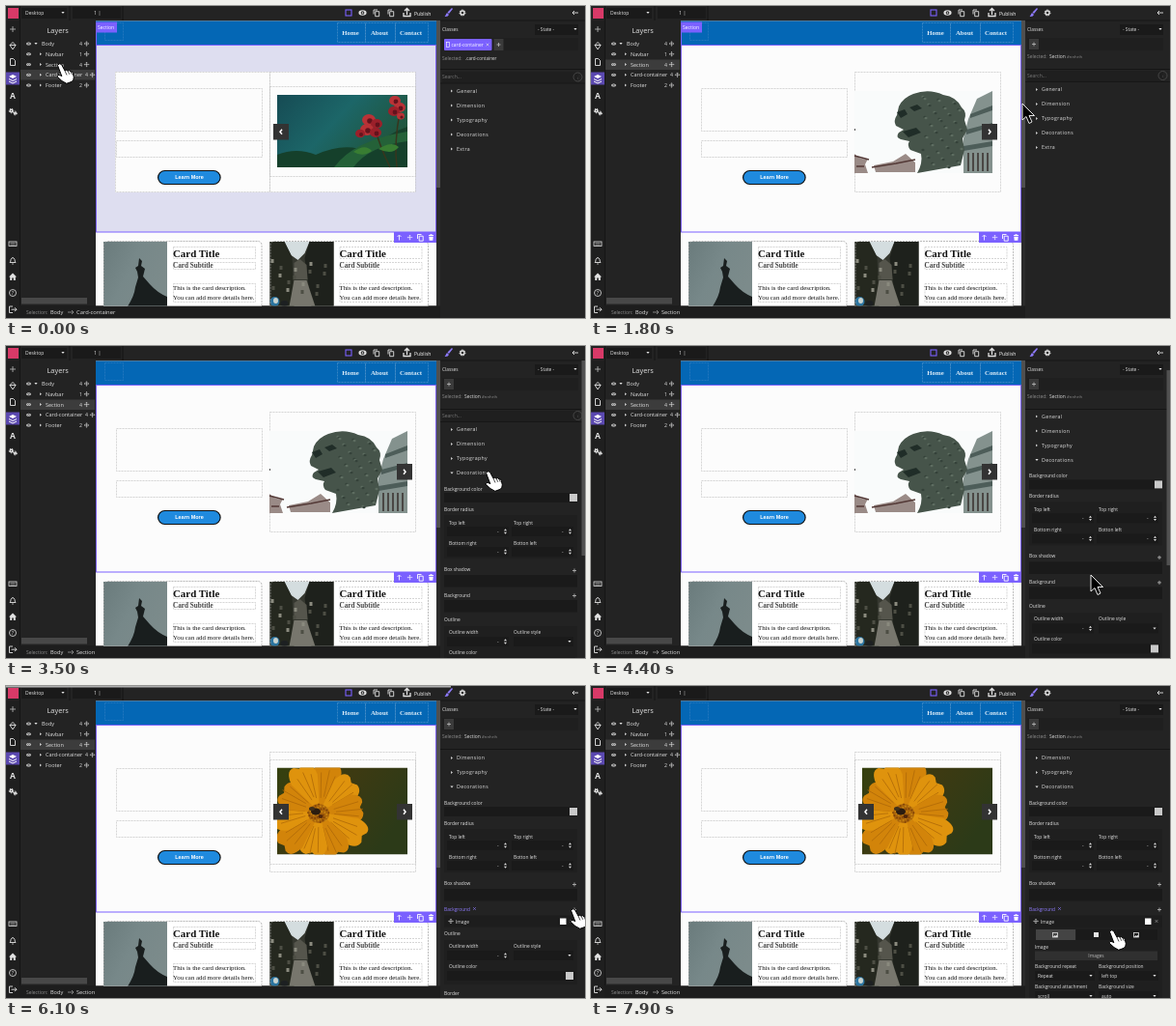
Recreate the animation shown at these times as an HTML page. Size 600 by 323 pixels, loop 8000 ms.

```html
<!DOCTYPE html>
<html lang="en">
<head>
<meta charset="utf-8">
<title>Page builder</title>
<style>
html, body { margin: 0; width: 100%; height: 100%; overflow: hidden; background: #232323; }
svg { display: block; width: 100vw; height: 100vh; }
text { font-family: "Open Sans", "Noto Sans", sans-serif; font-weight: 500; }
.serif { font-family: "Liberation Serif", serif; }
.arial { font-family: "Liberation Sans", sans-serif; }
.b { font-weight: bold; }
.wide { letter-spacing: .35px; }
.mid { text-anchor: middle; }
</style>
</head>
<body>
<svg id="stage" viewBox="0 0 600 323"></svg>
<script>
const INK = '#e2e2e2', DIM = '#8d8d8d', VIOLET = '#7b61ff', FIELD = '#1a1a1a', PANEL = '#232323';

// Drawing helpers; every one returns SVG markup.
const R = (x, y, w, h, fill, more = '') => `<rect x="${x}" y="${y}" width="${w}" height="${h}" fill="${fill}" ${more}/>`;
const T = (x, y, s, size = 4.9, fill = INK, cls = '') => `<text x="${x}" y="${y}" font-size="${size}" fill="${fill}" class="${cls}">${s}</text>`;
const F = (d, fill) => `<path d="${d}" fill="${fill}"/>`;
const L = (d, color = INK, w = .9) => `<path d="${d}" fill="none" stroke="${color}" stroke-width="${w}"/>`;
const E = (x, y, rx, ry, fill, more = '') => `<ellipse cx="${x}" cy="${y}" rx="${rx}" ry="${ry}" fill="${fill}" ${more}/>`;
const G = (id, s) => `<g id="${id}">${s}</g>`;
const at = (x, y, s) => `<g transform="translate(${x} ${y})">${s}</g>`;
const dash = (x, y, w, h, color = '#c4c4c4', r = 0) => R(x + .5, y + .5, w, h, 'none', `rx="${r}" stroke="${color}" stroke-width=".7" stroke-dasharray="2 1"`);
const eye = (x, y, k = 1) => E(x, y, 2.4 * k, 1.6 * k, INK) + E(x, y, 1.1 * k, 1.1 * k, PANEL) + E(x, y, .5 * k, .5 * k, INK);
const right = (x, y) => F(`M${x - .9} ${y - 1.4}l1.8 1.4l-1.8 1.4z`, INK);
const down = (x, y) => F(`M${x - 1.6} ${y - .9}h3.2l-1.6 1.9z`, INK);
const plus = (x, y, r = 2) => L(`M${x - r} ${y}h${2 * r}M${x} ${y - r}v${2 * r}`, '#bbb', .8);
const cross = (x, y, c = '#aaa') => L(`M${x - 1.4} ${y - 1.4}l2.8 2.8m0 -2.8l-2.8 2.8`, c, .6);
const move = (x, y, c = INK) => L(`M${x - 2.2} ${y}h4.4M${x} ${y - 2.2}v4.4M${x - .8} ${y - 1.5}l.8 -.8l.8 .8M${x - .8} ${y + 1.5}l.8 .8l.8 -.8M${x - 1.5} ${y - .8}l-.8 .8l.8 .8M${x + 1.5} ${y - .8}l.8 .8l-.8 .8`, c, .55);
const copy = (x, y, c = INK) => L(`M${x - 3} ${y + 1.5}v-4.5h4M${x - 1.3} ${y - 1.3}h4v5h-4z`, c);
const gear = (x, y, r) => `<circle cx="${x}" cy="${y}" r="${r}" fill="none" stroke="${INK}" stroke-width="1.4"/>` +
  `<circle cx="${x}" cy="${y}" r="${r + 1}" fill="none" stroke="${INK}" stroke-width="1" stroke-dasharray="1.3 1.3"/>`;
const arrow = (x, y, dir, c = INK) => L(`M${x - 3} ${y}h6M${x + dir} ${y - 2}l${2 * dir} 2l${-2 * dir} 2`, c, .9);

function toolbars() {
  let s = R(0, 0, 600, 323, PANEL) + R(0, 15, 14, 308, '#1f1f1f') + R(14, 310, 436, 13, '#1d1d1d');
  s += R(2, 2, 11, 11, '#d83a68');
  s += R(16, 2, 47, 11, FIELD) + T(20, 9.2, 'Desktop', 5) + down(59, 7);
  s += R(69, 1, 50, 12, FIELD) + T(91, 9.4, '1 |', 5.4);
  s += L('M14.5 0V310M66 0V15M121 0V15', '#151515', 1);
  s += R(352, 4, 6, 6, 'none', `stroke="${VIOLET}" stroke-width="1.1"`) + eye(369.5, 7, 1.7) + copy(384, 7) + copy(399, 7);
  s += L('M412 7v3.500h7v-3.500M415.500 9v-6M413 5l2.500 -2.500l2.500 2.500', INK, 1.3) + T(423, 9.6, 'Publish', 5.1, '#fff');
  s += R(0, 68.5, 14, 13, '#5b49b0');
  s += plus(7, 24, 3) + L('M7 37.500l3 3l-3 4.500l-3 -4.500zM4 40.500h6') + L('M4.500 54.500h3l2 2v5h-5z');
  s += F('M7 71l4 2l-4 2l-4 -2z', '#fff') + L('M3 75.500l4 2l4 -2M3 78l4 2l4 -2', '#fff', 1);
  s += T(4, 96, 'A', 8.5, INK, 'b') + gear(5.5, 108.5, 1.3) + gear(9.5, 111, .9);
  s += R(3, 244, 8, 4.5, 'none', `stroke="${INK}" stroke-width=".8"`) + L('M4.500 245.700h5M4.500 247.200h5', INK, .5);
  s += L('M4 265.500q1 -1 1 -3q2 -4 4 0q0 2 1 3zM6.300 267h1.400') + F('M3 280.500l4 -4l4 4h-1.200v3.500h-2v-2.500h-1.600v2.500h-2v-3.500z', INK);
  s += `<circle cx="7" cy="297" r="3.500" fill="none" stroke="${INK}" stroke-width=".8"/>` + T(5.7, 299, '?', 5.2);
  s += L('M7 311h-3.500v6.500h3.500M5.500 314.200h5.500M9 312.200l2 2l-2 2');
  return s;
}

function layers() {
  let s = G('rowCard', R(15, 66, 77, 10.500, '#3c3c3c')) + G('rowSection', R(15, 55.500, 77, 10.500, '#3c3c3c'));
  s += T(42.500, 28.200, 'Layers', 7.4);
  [['Body', 4], ['Navbar', 1], ['Section', 4], ['Card-container', 4], ['Footer', 2]].forEach(([name, n], i) => {
    const y = 39 + i * 10.75, wide = i == 3 ? 6 : 0;
    s += eye(23.500, y) + (i ? right(36, y) : down(31, y)) + T(i ? 41 : 37, y + 2, name, 5.5);
    s += T(76 + wide, y + 2, n, 5.2) + move(83.500 + wide, y);
  });
  s += R(16, 302, 68, 6.500, '#484848');
  s += T(21, 318.700, 'Selection:', 5, DIM) + T(46, 318.700, 'Body', 5.6) + arrow(67, 317, 1, DIM);
  return s + G('pathCard', T(73, 318.700, 'Card-container', 5.8)) + G('pathSection', T(73, 318.700, 'Section', 5.6));
}

const sideButton = (x, dir) => R(x, 122, 16, 16.500, '#333') + L(`M${x + 8 - dir} 127.700l${2 * dir} 2.500l${-2 * dir} 2.500`, '#fff', 1.5);

function redFlowers() {
  let s = R(281, 92, 135, 75, 'url(#teal)');
  s += F('M281 167v-13q20 -8 40 0q30 -14 55 -3q20 -20 40 -26v42z', '#15402b') + F('M340 167q20 -28 76 -37v10q-40 5 -56 27z', '#246138');
  s += L('M398 167Q387 145 381 122M405 167Q402 142 408 110', '#37351d', 1.5);
  s += F('M386 148q14 -9 21 -2q-7 9 -21 2M360 151q12 -9 19 -1q-9 7 -19 1', '#387d32');
  [[376, 118, 7], [384, 122, 6], [374, 128, 7], [383, 131, 6], [403, 98, 6], [367, 132, 5], [408, 105, 6], [402, 109, 6], [409, 114, 4]]
    .forEach(([x, y, r], i) => s += E(x, y, r, r * .85, i % 2 ? '#9b202a' : '#b93236') + E(x + 1, y + 1, r * .4, r * .4, '#63131d'));
  return s + dash(273, 83, 151, 93) + sideButton(277, -1);
}

function statue() {
  let s = R(273, 88, 143, 85, '#f9fbfb');
  s += F('M386 173v-36l5 -20l9 -21l16 -8v85z', '#84928e') + F('M393 112l23 -9v5l-23 8zM389 128l27 -7v4l-27 8zM386 145l30 -5v5l-30 5z', '#4d5d59');
  for (let x = 390; x < 415; x += 5) s += R(x, 152, 2, 19, '#4a4744');
  s += F('M273 153q6 7 14 5l-3 6l3 9h-14zM293 165l20 -4l13 -8l10 9v10h-41z', '#9a8b87') + L('M273 155l15 4M291 167l25 -4l20 -4M275 166h8', '#533936', 1.6);
  s += F('M338 173q6 -10 4 -20l-11 -4q-4 -5 -1 -9l-9 -2q-6 -2 -2 -7l5 -3l-8 -4q-3 -5 1 -11l2 -9q4 -9 15 -13q16 -6 31 1q14 2 19 13q6 5 3 13l3 10l-5 9l2 12l-4 16z', '#46544a');
  s += F('M323 130l14 -4l5 5l-13 5zM317 110l8 -3l3 5l-7 4zM330 105l8 -3l5 4l-8 3z', '#202d28');
  for (let i = 0; i < 60; i++) s += E(344 + i * 17 % 41, 94 + i * 23 % 74, 1.6, 1.3, i % 2 ? '#35423a' : '#5d6c60');
  return s + R(273, 127, 1, 2, '#555') + sideButton(405, 1);
}

function orangeFlower() {
  let s = R(281, 84.500, 135, 90, 'url(#moss)');
  for (let i = 0; i < 10; i++) {
    const r = [54, 49, 46][i % 3], c = i % 2 ? '#df930d' : '#d2840a';
    s += `<g transform="rotate(${i * 36 + 12} 325 131)">` + F(`M325 131l-15 ${-r * .7}q0 ${-r * .3} 9 ${-r * .28}l5 3l6 -3q10 1 9 ${r * .3}z`, c) +
      L('M323 116l-5 -26M326 114v-28M328 116l5 -25', '#ad6808', .7) + '</g>';
  }
  s += E(324, 132, 11, 10, '#a8630a');
  for (let i = 0; i < 40; i++) s += E(324 + Math.cos(i * 2.4) * Math.sqrt(i) * 1.8, 132 + Math.sin(i * 2.4) * Math.sqrt(i) * 1.6, .9, .9, i % 2 ? '#c98711' : '#7d4009');
  s += E(321, 130, 5, 3.500, '#2a1c10') + E(317, 127, 3, 2, '#40301a') + E(326, 135, 2.500, 2, '#51260a');
  s = `<g clip-path="url(#photo)">${s}</g>`;
  return s + dash(273, 76, 151, 108) + sideButton(277, -1) + sideButton(405, 1);
}

const tower = R(101, 244, 66, 67, 'url(#sky)') +
  F('M126 311q7 -11 8 -20l3 -10l-1 -6l-2 -4l3 -2l1 -8l3 3l-1 5l4 3l-2 8l7 8q8 9 18 13v10z', '#191e1e');

function alley() {
  let s = R(101, 244, 66, 67, '#363830') + F('M116 244h26l-5 12l-7 7l-7 -5z', '#d4dddf');
  s += F('M101 244h15l8 16l2 51h-25z', '#25281f') + F('M142 244h25v67h-23l-7 -50z', '#1e211c') + F('M126 266l6 -4l7 6l1 15h-14z', '#55554c') + F('M126 284h13l9 27h-27z', '#77766d');
  for (let i = 0; i < 16; i++) s += R(102 + i * 23 % 61, 262 + i * 17 % 36, 3, 4, i % 3 ? '#4d4e44' : '#8a8a7e');
  return s + E(106, 306, 5, 5, '#2b74a0') + E(107, 305, 2.500, 3, '#c7d2cf') + E(116, 308, 4, 3, '#1d2022');
}

const card = photo => R(101, 244, 164, 70, '#fff', 'rx="4"') + photo + dash(101, 243, 163.500, 76, '#a0a0a0', 4) +
  dash(173, 249, 85, 12) + dash(173, 265, 85, 7) + dash(173, 287, 85, 19) +
  T(173, 259.500, 'Card Title', 10.9, '#111', 'serif b') + T(173, 270.800, 'Card Subtitle', 7.2, '#444', 'serif b') +
  T(173, 294.300, 'This is the card description.', 6.85, '#111', 'serif') + T(173, 304, 'You can add more details here.', 6.85, '#111', 'serif');

function page() {
  let s = R(93, 15.500, 353, 295, '#fcfcfc') + R(93, 15.500, 353, 24.500, '#0467b5');
  s += dash(102, 17, 19, 18, '#2f7cc0');
  [[343, 29, 'Home'], [372, 31, 'About'], [403, 34, 'Contact']].forEach(([x, w, name]) =>
    s += dash(x, 17, w, 20, '#4d91cb') + T(x + w / 2 - .5, 30, name, 6.8, '#dcecf8', 'serif b mid'));
  s += G('tint', R(93, 40, 353, 194, '#dedef0') + R(113, 68, 311, 125, '#fcfcfc') + dash(113, 68, 160, 124));
  s += dash(114, 85, 151, 44) + dash(114, 139, 151, 17) + dash(273, 68, 151, 124);
  s += R(157.600, 170.500, 64.500, 14, '#1f8ade', 'rx="7" stroke="#111" stroke-width="1.200"') + T(190, 179.400, 'Learn More', 5.5, '#fff', 'arial b mid');
  s += G('slideRed', redFlowers()) + G('slideStatue', statue()) + G('slideOrange', orangeFlower());
  s += card(tower) + at(172.500, 0, card(alley()));
  s += R(93.500, 40.500, 352, 193.500, 'none', `stroke="${VIOLET}" stroke-width="1"`);
  s += G('badge', R(93, 16.500, 22, 11, VIOLET) + T(95, 24, 'Section', 5, '#fff') + L('M93.500 27V41', VIOLET, 1));
  s += R(402, 234, 44, 11, VIOLET) + L('M407.500 242.500v-5M405.500 239l2 -2l2 2', '#fff', .8) + move(418.500, 239.500, '#fff') + copy(429.500, 239.500, '#fff');
  s += F('M438 238h5v-1h-1.500v-.8h-2v.8h-1.500zM438.300 238.700h4.400l-.4 4h-3.600z', '#fff');
  return s + R(446, 15, 4, 296, '#2b2b2b') + R(446, 15, 4, 173, '#505050');
}

const label = (x, y, s, c = INK) => T(x, y, s, 4.85, c);
const input = (x, y, w) => R(x, y, w, 10, FIELD);
const number = (x, y) => input(x, y, 64) + T(x + 52, y + 6.500, '-', 5) + F(`M${x + 59} ${y + 4.300}l1.500 -2l1.500 2zM${x + 59} ${y + 5.700}l1.500 2l1.500 -2z`, INK);
const select = (x, y, s = '') => input(x, y, 62) + label(x + 3, y + 7, s) + down(x + 58, y + 5);
const swatch = (x, y, c = '#c9c9c9', w = 8) => R(x, y, w, w, c);

function decorations() {
  let s = label(454, 149.800, 'Background color') + input(454, 152, 138) + swatch(584, 153);
  s += label(454, 171, 'Border radius') + R(454, 175, 138, 45, '#1f1f1f');
  [['Top left', 457, 185], ['Top right', 524, 185], ['Bottom right', 457, 206], ['Botton left', 524, 206]].forEach(([name, x, y]) =>
    s += label(x + 2, y, name) + number(x, y + 2));
  s += label(454, 233, 'Box shadow') + plus(589, 232.500) + R(454, 237, 138, 12.500, FIELD);
  s += G('noLayer', label(454, 259.500, 'Background') + R(454, 263, 138, 12.500, FIELD));
  s += plus(589, 258.500);
  s += label(454, 285, 'Outline') + R(454, 290, 138, 46, '#1f1f1f') + label(459, 298, 'Outline width') + number(457, 301);
  s += label(526, 298, 'Outline style') + select(526, 301) + label(459, 319, 'Outline color') + input(457, 322, 133) + swatch(580, 323);
  s += label(454, 347, 'Border');
  const expanded = R(454, 265, 138, 90, '#1f1f1f') + R(461, 279, 41, 11, '#444') + R(503, 279, 41, 11, FIELD) + R(545, 279, 42, 11, FIELD) +
    [481, 565].map(x => R(x - 2.500, 282.500, 5, 4.500, 'none', 'stroke="#ddd" stroke-width=".8"') + F(`M${x - 2} 287l1.500 -2l1 1l1 -1.500l1 2.500z`, INK)).join('') + R(521, 282, 5, 5, INK) +
    label(460, 299, 'Image') + R(460, 301.500, 127, 9.500, '#303030') + T(523.500, 308, 'Images', 4.9, '#bbb', 'mid') +
    label(460, 319, 'Background repeat') + label(526, 319, 'Background position') + select(460, 322, 'Repeat') + select(526, 322, 'left top') +
    label(460, 340, 'Background attachment') + label(526, 340, 'Background size') + select(460, 343, 'scroll') + select(526, 343, 'auto');
  s += G('details', expanded);
  s += G('newLayer', label(454, 259.500, 'Background', '#8f7bff') + cross(485.500, 257.500, '#8f7bff') + R(454, 264.500, 138, 12, '#1d1d1d') +
    move(461, 270.500) + label(466, 272.500, 'Image') + swatch(574, 267.500, '#fff', 6.500) + cross(586, 270.500));
  return s;
}

function inspector() {
  let s = F('M462 2l1 1l-4 5l-1.500 -1.500zM457 7l2 2q-1 2.500 -4.500 2q1.300 -1 1.200 -2z', '#8f7bff') + gear(473, 7, 2) + arrow(590, 7, -1);
  s += L('M450 15H600', '#171717', 1) + label(452, 25.500, 'Classes') + R(548, 19, 45, 11, FIELD) + label(551, 25.500, '- State -') + down(590, 24);
  s += R(452, 33, 141, 13, '#1f1f1f');
  s += G('tagCard', R(454, 34, 49.500, 12, VIOLET, 'rx="1"') + R(456.500, 37.500, 3, 5, 'none', 'stroke="#fff" stroke-width=".6"') + T(461.500, 41.700, 'card-container', 4.9, '#fff') + cross(499, 40, '#ddd') +
    R(505.500, 34, 10, 12, '#3a3a3a') + plus(510.500, 40) + T(452, 55.500, 'Selected:', 4.9, DIM) + T(476, 55.500, '.card-container', 4.6));
  s += G('tagSection', R(454, 34, 10, 11, '#3a3a3a') + plus(459, 39.500) + T(452, 54, 'Selected:', 4.9, DIM) + T(475, 54, 'Section', 4.9) + T(493, 54, '#nnhrih', 4.3, DIM));
  s += L('M450 65.500H600', '#151515', 1);
  let list = R(452, 67, 141, 11, '#1f1f1f') + T(452, 73.700, 'Search...', 5, '#777') + L('M450 78.500H600', '#151515', .8) +
    `<circle cx="592.500" cy="72" r="4.500" fill="none" stroke="#555" stroke-width=".7"/>` + T(591.700, 74, 'i', 4, '#666');
  ['General', 'Dimension', 'Typography', 'Decorations'].forEach((name, i) =>
    list += T(467, 88.200 + i * 15, name, 5.2, INK, 'wide') + (i < 3 ? right(462, 86.500 + i * 15) : ''));
  list += G('closed', right(462, 131.500) + T(467, 148.200, 'Extra', 5.2, INK, 'wide') + right(462, 146.500)) + G('open', down(462, 131.500) + decorations());
  return s + `<g clip-path="url(#list)">${G('scroll', list)}</g>` + G('thumb', R(596.500, 15, 3.500, 202, '#505050'));
}

const gradient = (id, a, b, c) => `<linearGradient id="${id}" x2="1" y2=".5"><stop stop-color="${a}"/><stop offset=".5" stop-color="${b}"/><stop offset="1" stop-color="${c}"/></linearGradient>`;
const handShape = `<path d="M-2.500 1.500Q-1 -1.500 1.500 .5L5 7q1 -1.500 3 0q1.500 -1 3 .8q1.800 -.4 2.300 1.500l1 4.500q0 3 -2 4.500l-5.500 2q-5 -2 -9.500 -7q-.5 -3 3.500 -1.200l1 .6z" fill="#fff" stroke="#000" stroke-width="1"/>` +
  L('M5 7l2 4.500M8 7l1.800 3.800M11 7.800l1.300 3', '#000', .7);
const arrowShape = '<path d="M0 0V17L4 13.500L7 20.500L10 19L7 12.500H12.500Z" fill="#000" stroke="#fff" stroke-width=".9"/>';

const stage = document.getElementById('stage');
stage.innerHTML = `<defs>${gradient('teal', '#164b54', '#1c6668', '#20543a')}${gradient('moss', '#35400f', '#3d3a12', '#2c3a18')}${gradient('sky', '#6a7b7c', '#778889', '#7c8b8b')}
  <clipPath id="list">${R(450, 66, 150, 257, '#000')}</clipPath><clipPath id="photo">${R(281, 84.500, 135, 90, '#000')}</clipPath>
  <clipPath id="view">${R(93, 15, 357, 295.500, '#000')}</clipPath></defs>` +
  toolbars() + layers() + `<g clip-path="url(#view)">${page()}</g>` + R(450, 15, 150, 308, PANEL) + inspector() +
  G('topEdge', R(0, 0, 461, 1.5, '#b0b0b0')) + G('pointer', G('hand', handShape) + G('arrow', arrowShape));

const parts = Object.fromEntries([...stage.querySelectorAll('g[id]')].map(g => [g.id, g]));
const show = (id, on) => parts[id].style.display = on ? '' : 'none';
const place = (id, x, y) => parts[id].setAttribute('transform', `translate(${x} ${y})`);
const ease = (t, a, b) => { const k = Math.min(1, Math.max(0, (t - a) / (b - a))); return k * k * (3 - 2 * k); };

// Pointer stops: time, x, y
const route = [[0, 56, 60], [1450, 56, 60], [1800, 447, 101], [2400, 439, 97], [2850, 500, 130], [3600, 500, 130], [4200, 518, 237],
  [5400, 518, 237], [5800, 588, 231], [6400, 588, 231], [7100, 476, 243], [7400, 476, 243], [7850, 540, 253], [8000, 540, 253]];

function draw(t) {
  const i = route.findIndex(p => p[0] > t), [t0, x0, y0] = route[i - 1], [t1, x1, y1] = route[i], k = ease(t, t0, t1);
  const section = t >= 500, open = t >= 3000, added = t >= 5900, scrolled = ease(t, 4200, 4600);
  const hand = t < 1550 || (t >= 2700 && t < 3800) || t >= 5700;
  for (const id of ['row', 'path', 'tag']) { show(id + 'Card', !section); show(id + 'Section', section); }
  show('tint', t < 1600);
  show('badge', t < 2550);
  show('slideRed', t < 1750);
  show('slideStatue', t >= 1750 && t < 5700);
  show('slideOrange', t >= 5700);
  show('closed', !open);
  show('open', open);
  show('noLayer', !added);
  show('newLayer', added);
  show('details', t >= 7350);
  show('thumb', open && t < 4800);
  show('topEdge', t >= 5900 && t < 6800);
  show('hand', hand);
  show('arrow', !hand);
  place('scroll', 0, (section ? 0 : 1.5) - 27 * scrolled);
  place('thumb', 0, 20 * scrolled);
  place('pointer', x0 + (x1 - x0) * k, y0 + (y1 - y0) * k);
}

const frame = now => { draw(now % 8000); requestAnimationFrame(frame); };
draw(0);
requestAnimationFrame(frame);
</script>
</body>
</html>
```
